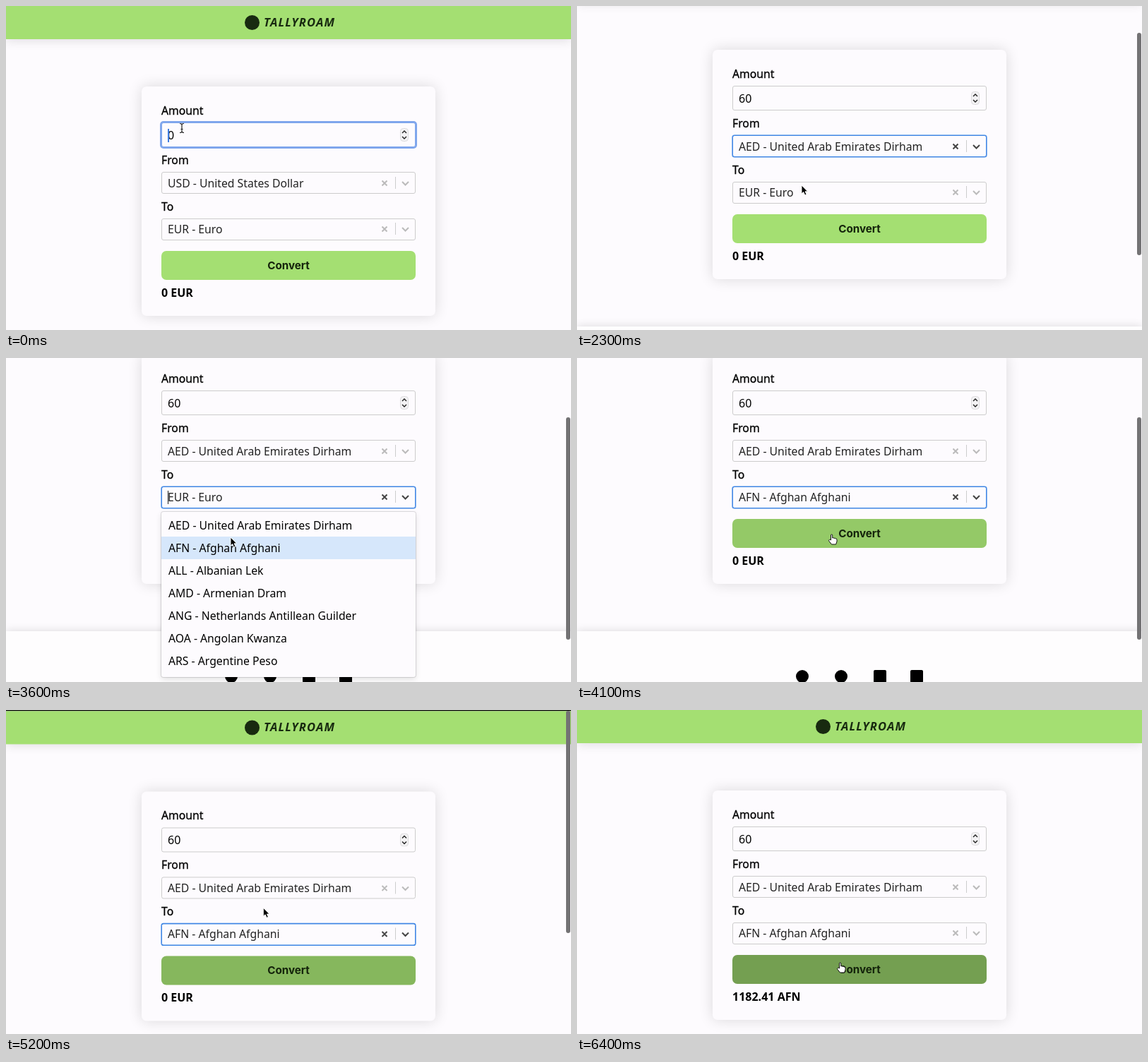
These frames come from a looping animation (800x459 px, 6.5 s). An HTML page:

```html
<!DOCTYPE html>
<html lang="en">
<head>
<meta charset="utf-8">
<title>Currency converter</title>
<style>
  html, body { margin: 0; width: 100%; height: 100%; overflow: hidden; background: #000; }
  #stage { position: relative; width: 800px; height: 459px; overflow: hidden;
    font: 15.75px/20px "Noto Sans", "Open Sans", sans-serif; color: #222; }
  #stage * { position: absolute; box-sizing: border-box; white-space: pre; }
  #page { left: 0; top: 0; width: 800px; height: 665px; background: #fdfbfe; }
  header { left: 0; top: 0; width: 800px; height: 46.5px; background: #a4df72;
    box-shadow: 0 2px 14px rgba(0,0,0,.12); }
  .logo { left: 338px; top: 13px; width: 21px; height: 21px; border-radius: 50%; background: #182a10; }
  .name { left: 365px; top: 13px; font-size: 16.5px; font-weight: 700; font-style: italic;
    letter-spacing: .07em; color: #182a10; }
  #card { left: 192px; top: 114px; width: 416px; height: 324.5px; border-radius: 7px;
    background: #fdfbfe; box-shadow: 0 0 20px rgba(0,0,0,.14); }
  .label { left: 220px; color: #000; -webkit-text-stroke: .3px #000; }
  .box { left: 220px; width: 360px; border: 1px solid #ccc; border-radius: 3px; background: #fdfbfe; }
  #amount { top: 165px; height: 35px; color: #000; }
  #amount.focus { border-color: #7fa6ec; box-shadow: 0 0 0 2px #7fa6ec; }
  #digits { left: 8px; top: 7px; font-size: 16px; }
  .select { height: 31px; }
  .select.hover { border-color: #b0b0b0; }
  .select.focus { border-color: #3f86e4; box-shadow: 0 0 0 .6px #3f86e4; }
  .select .value { left: 8px; top: 4.5px; }
  .select svg { left: 309px; top: 4.5px; stroke: #bbb; }
  .select.focus svg { stroke: #444; }
  .caret { width: 1.5px; height: 19px; background: #222; }
  .select .caret { left: 8px; top: 5px; width: 1px; }
  #amount .caret { top: 8px; background: #3f7de0; }
  #button { left: 220px; top: 347px; width: 360px; height: 41px; border-radius: 7px; text-align: center;
    font: 700 15.2px/41px Inter, "Liberation Sans", sans-serif; color: #14230b; }
  #result { left: 220px; top: 396px; font-size: 16px; font-weight: 700; color: #000; }
  footer { left: 0; top: 505.5px; width: 800px; height: 160px; background: #fefdfe;
    box-shadow: 0 0 12px rgba(0,0,0,.14); }
  footer i { top: 55px; width: 18px; height: 18px; background: #000; border-radius: 50%; }
  footer i.square { border-radius: 2px; }
  .menu { left: 220px; width: 360px; height: 234px; overflow: hidden; background: #fdfbfe; border-radius: 3px;
    z-index: 1; box-shadow: 0 0 0 1px rgba(0,0,0,.12), 0 3px 9px rgba(0,0,0,.12); }
  .menu div { left: 0; width: 360px; height: 32px; padding-left: 10px; line-height: 32px; color: #000; }
  #thumb { left: 793px; width: 5.5px; height: 315px; border-radius: 3px; background: #737274; }
  #cursor { left: 0; top: 0; overflow: visible; }
</style>
</head>
<body>
<div id="stage">
  <div id="page">
    <footer>
      <i style="left:310px"></i><i style="left:365px"></i>
      <i class="square" style="left:419.5px"></i><i class="square" style="left:472px"></i>
    </footer>
    <header><div class="logo"></div><div class="name">TALLYROAM</div></header>
    <div id="card"></div>
    <div class="label" style="top:137.5px">Amount</div>
    <div class="box" id="amount">
      <span id="digits"></span><span class="caret"></span>
      <svg style="left:337px;top:7px" width="12" height="19" fill="none" stroke="#222" stroke-width="1.4">
        <rect x=".5" y=".5" width="11" height="18" rx="4" fill="#f3f2f4" stroke="#dcdbdd" stroke-width="1"/>
        <path d="M3 7L6 4L9 7M3 12L6 15L9 12"/>
      </svg>
    </div>
    <div class="label" style="top:207.5px">From</div>
    <div class="label" style="top:273.5px">To</div>
    <div id="button">Convert</div>
    <div id="result"></div>
  </div>
  <div id="thumb"></div>
  <svg id="cursor" width="1" height="1">
    <path id="beam" d="M-3 -6.5Q0 -6.5 0 -4.5Q0 -6.5 3 -6.5M0 -5V5M-3 6.5Q0 6.5 0 4.5Q0 6.5 3 6.5M-1.5 1.5H1.5"
      fill="none" stroke="#222" stroke-width="1.2"/>
    <path id="arrow" d="M0 0V12L2.7 9.5L4.8 14L7 13L5 8.8H8.6Z" fill="#000" stroke="#fff" stroke-width=".9"/>
    <path id="hand" d="M-1.5 8V1Q-1.5 0 -.5 0Q.7 0 .7 1V5Q2.4 4 3 5.4Q4.8 4.6 5.2 6Q7 5.6 7 7.5V10L5.6 14H-.5L-4 9.6Q-5 8 -3.6 7.3Q-2.6 7 -1.5 8Z"
      fill="#fff" stroke="#111" stroke-width="1"/>
  </svg>
</div>
<script>
const LOOP = 6500, STEP = 100;
const FROM_TOP = 235, TO_TOP = 300.5, MENU_GAP = 36.5, MENU_PAD = 3, ROW = 32;
// Moments of the story, in ms
const TYPE = 500, OPEN_FROM = 2000, PICK_FROM = 2200, OPEN_TO = 3200, PICK_TO = 3900, BLUR = 6000, ANSWER = 6200;

const $ = id => document.getElementById(id);
const page = $("page");
const options = ["AED - United Arab Emirates Dirham", "AFN - Afghan Afghani", "ALL - Albanian Lek",
  "AMD - Armenian Dram", "ANG - Netherlands Antillean Guilder", "AOA - Angolan Kwanza", "ARS - Argentine Peso"];

const show = (el, on) => el.style.display = on ? "" : "none";
const within = (v, a, b) => v >= a && v < b;
const progress = (t, start, length) => Math.min(1, Math.max(0, (t - start) / length));
const easeOut = (...span) => 1 - (1 - progress(...span)) ** 3;
const smooth = (...span) => { const u = progress(...span); return u * u * (3 - 2 * u); };

// Opening a menu scrolls it into view; at the end the page flicks back to the top and bounces.
const scrollAt = t => 52 * easeOut(t, OPEN_FROM - 100, 300) + 67 * easeOut(t, OPEN_TO - 100, 300)
  - 119 * smooth(t, 4550, 520) - 1.7 * Math.sin(Math.PI * progress(t, 5000, 300));

function pointerAt(t) {
  const toFrom = smooth(t, 1200, 300), drift = smooth(t, 1500, 500);
  const toButton = smooth(t, PICK_TO, 200), back = smooth(t, 4900, 860);
  return [249 + 63 * toFrom + 6 * drift + 43 * toButton + 12 * back,
    173 + 81 * toFrom - 4 * toButton + 108 * back];
}

const shadeAt = t => smooth(t, PICK_TO, 510) - smooth(t, 5050, 360) + smooth(t, 5600, 400);

function add(className, top, html) {
  const el = document.createElement("div");
  el.className = className;
  el.style.top = top + "px";
  el.innerHTML = html;
  page.append(el);
  return el;
}

function makeSelect(top) {
  const box = add("box select", top, `<span class="value"></span><span class="caret"></span>
    <svg width="50" height="20" fill="none" stroke-width="2">
      <path d="M2.5 6.5L9.5 13.5M9.5 6.5L2.5 13.5M31 8L35.5 12.5L40 8"/>
      <path d="M21.5 1V18" stroke="#ccc" stroke-width="1"/></svg>`);
  const menu = add("menu", top + MENU_GAP, options.map((text, i) =>
    `<div style="top:${MENU_PAD + ROW * i}px">${text}</div>`).join(""));
  return ({ text, focus, hover = false, open, pointerY }) => {
    const active = Math.floor((pointerY - top - MENU_GAP - MENU_PAD) / ROW);
    box.classList.toggle("focus", focus);
    box.classList.toggle("hover", hover);
    box.querySelector(".value").textContent = text;
    show(box.querySelector(".caret"), open);
    show(menu, open);
    [...menu.children].forEach((el, i) => el.style.background = i === active ? "#d6e7fb" : "none");
  };
}

const setFrom = makeSelect(FROM_TOP), setTo = makeSelect(TO_TOP);

function draw(t) {
  const scroll = scrollAt(t), shade = shadeAt(t), [x, y] = pointerAt(t);
  const pointerY = y + scroll;
  const fromOpen = within(t, OPEN_FROM, PICK_FROM), toOpen = within(t, OPEN_TO, PICK_TO);
  page.style.transform = `translateY(${-scroll}px)`;

  $("amount").classList.toggle("focus", t < OPEN_FROM);
  $("digits").textContent = t < TYPE ? "0" : "60";
  const caret = $("amount").querySelector(".caret");
  show(caret, t < 900);
  caret.style.left = (t < TYPE ? 8 : 17) + "px";

  setFrom({ text: t < PICK_FROM ? "USD - United States Dollar" : options[0], open: fromOpen, pointerY,
    focus: within(t, OPEN_FROM, OPEN_TO), hover: within(pointerY, FROM_TOP, FROM_TOP + 31) });
  setTo({ text: t < PICK_TO ? "EUR - Euro" : options[1], open: toOpen, pointerY,
    focus: within(t, OPEN_TO, BLUR) });

  const mix = (a, b) => a + (b - a) * shade;
  $("button").style.background = `rgb(${mix(164, 116)},${mix(223, 159)},${mix(114, 81)})`;
  $("result").textContent = t < ANSWER ? "0 EUR" : "1182.41 AFN";

  $("thumb").style.top = 2 + .69 * scroll + "px";
  $("thumb").style.opacity = progress(t, OPEN_FROM - 100, 100) - progress(t, 6100, 300);

  const hand = !fromOpen && !toOpen && within(pointerY, 347, 388), beam = within(pointerY, 165, 200);
  show($("cursor"), !within(t, TYPE, 1300));
  $("cursor").style.transform = `translate(${x}px,${y}px)`;
  show($("beam"), beam);
  show($("hand"), hand);
  show($("arrow"), !beam && !hand);
}

const start = performance.now();
function tick() {
  const t = (performance.now() - start) % LOOP;
  draw(Math.floor(t / STEP) * STEP);
  requestAnimationFrame(tick);
}
tick();
</script>
</body>
</html>
```
